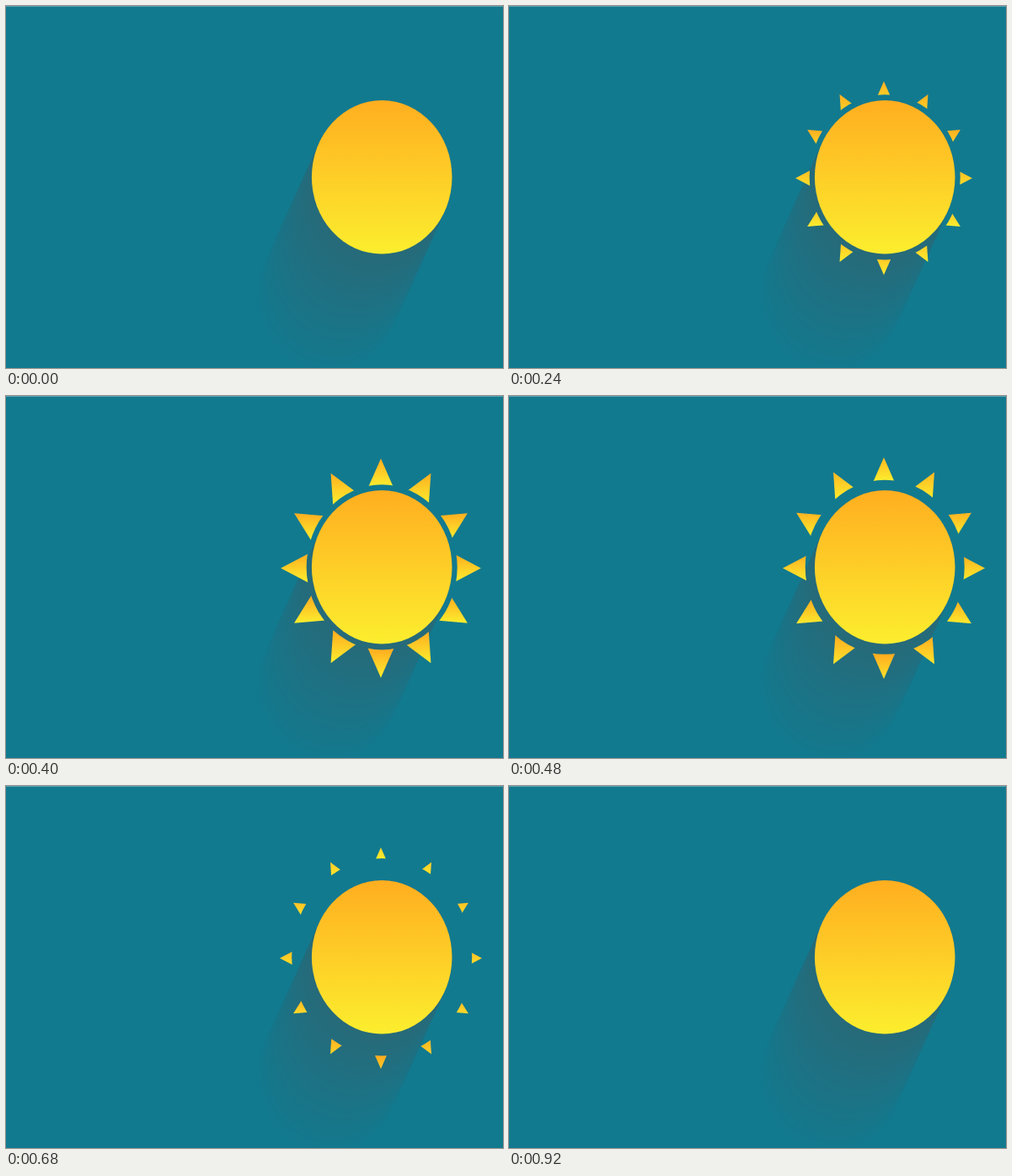
An HTML page that plays this animation: 590 by 430 pixels, repeating every 1 s.

```html
<!DOCTYPE html>
<html lang="en">
<head>
<meta charset="utf-8">
<title>Shining sun</title>
<style>
  html, body { margin: 0; width: 100%; height: 100%; overflow: hidden; background: #127a8f; }
  svg { display: block; width: 590px; height: 430px; }
</style>
</head>
<body>
<svg id="stage" viewBox="0 0 590 430" xmlns="http://www.w3.org/2000/svg">
  <defs id="defs">
    <linearGradient id="fire" x1="0" y1="0" x2="0" y2="1">
      <stop offset="0" stop-color="#ffae20"/>
      <stop offset="1" stop-color="#fcee2e"/>
    </linearGradient>
    <mask id="ring" maskUnits="userSpaceOnUse" x="0" y="0" width="590" height="430">
      <rect width="590" height="430" fill="#fff"/>
      <ellipse id="hole" fill="#000"/>
    </mask>
  </defs>
  <rect width="590" height="430" fill="#127a8f"/>
  <rect width="590" height="1" fill="#fff" opacity=".3"/>
  <g id="shadow"></g>
  <g id="rays" mask="url(#ring)"></g>
  <ellipse id="sun" fill="url(#fire)"/>
</svg>
<script>
const LOOP = 1000, STEP = 40;
const STRETCH = 1.096;               // everything round is slightly tall
const SUN = { x: 446.2, y: 203.3, r: 83.3 };
const HUB = { x: 445, y: 204.5 };    // centre the rays point away from
const INNER = 89.5, OUTER = 120, SLOPE = 0.48, DEPTH = 60;

const byId = id => document.getElementById(id);
const clamp = (v, lo, hi) => Math.min(hi, Math.max(lo, v));

function set(node, attrs) {
  for (const key in attrs) node.setAttribute(key, attrs[key]);
  return node;
}

function add(parent, tag, attrs) {
  const node = document.createElementNS("http://www.w3.org/2000/svg", tag);
  return parent.appendChild(set(node, attrs));
}

function oval(x, y, r) {
  return { cx: x, cy: y, rx: r, ry: r * STRETCH };
}

// Point at a distance along a ray and a sideways offset from it
function rayPoint(angle, along, side) {
  const s = Math.sin(angle), c = Math.cos(angle);
  return [HUB.x + along * s + side * c, HUB.y - (along * c - side * s) * STRETCH];
}

function triangle(angle, tip, depth) {
  const half = depth * SLOPE;
  return [
    rayPoint(angle, tip, 0),
    rayPoint(angle, tip - depth, half),
    rayPoint(angle, tip - depth, -half)
  ];
}

// Stacked ovals fading into the background
function buildShadow() {
  const near = [39, 106, 121], far = [18, 122, 143], count = 48;
  for (let i = count; i >= 0; i--) {
    const k = i / count;
    const rgb = near.map((v, j) => Math.round(v + (far[j] - v) * k));
    add(byId("shadow"), "ellipse", {
      ...oval(SUN.x - 66 * k, SUN.y + 146 * k, SUN.r),
      fill: `rgb(${rgb})`
    });
  }
}

function buildRay(_, i) {
  const angle = i * Math.PI / 6;
  const ys = triangle(angle, OUTER, OUTER - INNER).map(p => p[1]);
  const gradient = add(byId("defs"), "linearGradient", {
    id: "ray" + i, href: "#fire", gradientUnits: "userSpaceOnUse", x1: 0, x2: 0
  });
  const shape = add(byId("rays"), "polygon", { fill: `url(#ray${i})` });
  return { angle, gradient, shape, top: Math.min(...ys), bottom: Math.max(...ys) };
}

set(byId("sun"), oval(SUN.x, SUN.y, SUN.r));
buildShadow();
const rays = Array.from({ length: 12 }, buildRay);

function draw(time) {
  const n = Math.floor((time % LOOP) / STEP);
  const tip = Math.min(OUTER, 84.1 + 3.475 * n);
  const hole = INNER + 2.5 * clamp(n - 10, 0, 13);
  const shift = tip - OUTER + hole - INNER;

  set(byId("hole"), oval(SUN.x, SUN.y, hole));
  for (const ray of rays) {
    const dy = -shift * Math.cos(ray.angle) * STRETCH;
    set(ray.gradient, { y1: ray.top + dy, y2: ray.bottom + dy });
    set(ray.shape, { points: triangle(ray.angle, tip, DEPTH).join(" ") });
  }
}

const start = performance.now();
function tick() {
  draw(performance.now() - start);
  requestAnimationFrame(tick);
}
tick();
</script>
</body>
</html>
```
